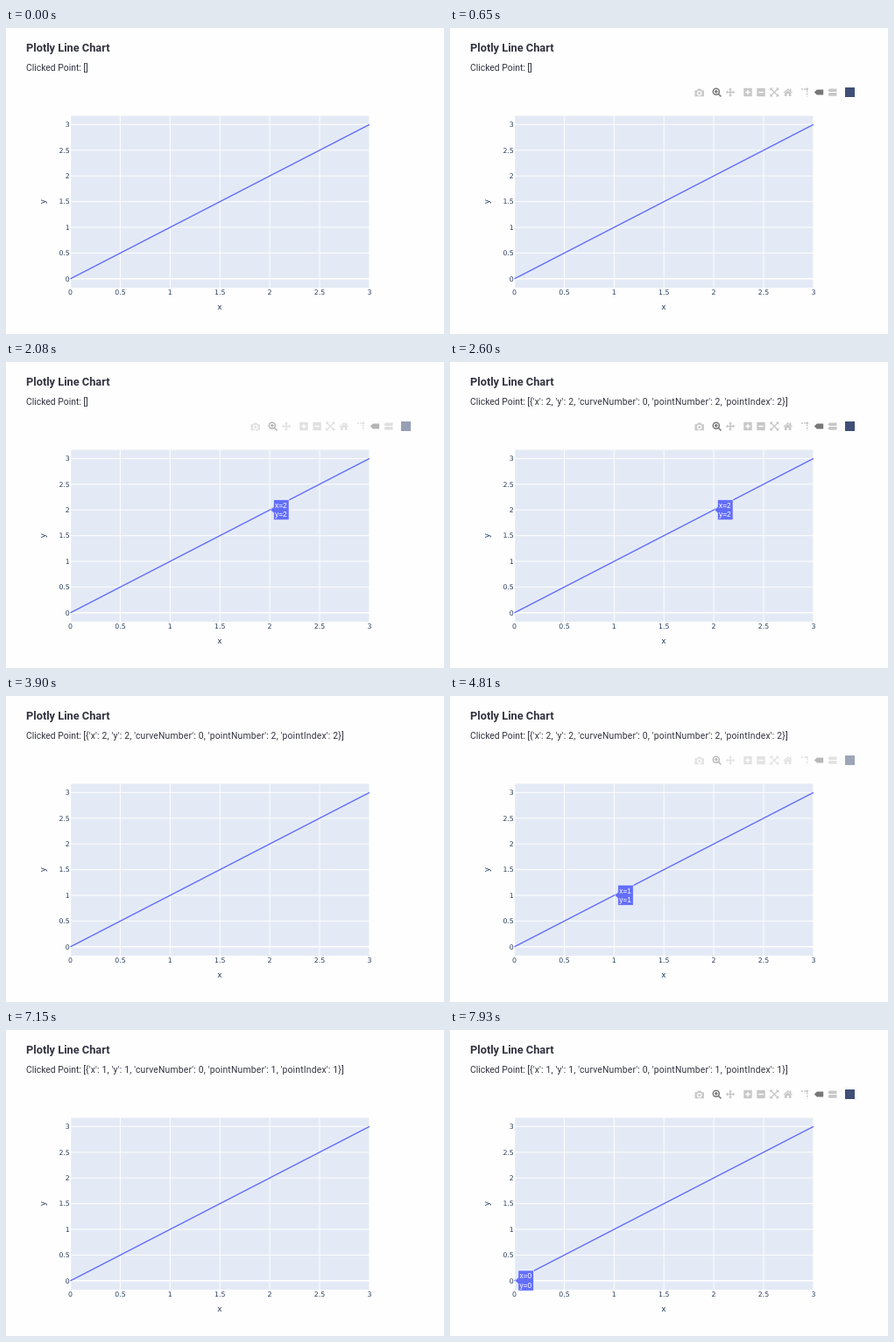
Animation of 500x350 px, one loop 8000 ms. Source, as an HTML page:

```html
<!DOCTYPE html>
<html lang="en">
<head>
<meta charset="utf-8">
<title>Line chart with click events</title>
<style>
html, body { margin: 0; width: 100%; height: 100%; overflow: hidden; background: #fefefe; }
svg { display: block; width: 100vw; height: 100vh; }
.page { font-family: Roboto, "Noto Sans", sans-serif; fill: #31333f; }
.axis { font-family: "DejaVu Sans", sans-serif; font-size: 7.8px; fill: #2a3f5f; }
.title { font-size: 8.9px; text-anchor: middle; }
.tip { font-family: "Liberation Sans", Arial, sans-serif; font-size: 8.3px; fill: #fff; }
#bar { fill: #c7c7c7; stroke: #c7c7c7; stroke-width: 0; }
#bar .on { fill: #777; stroke: #777; }
#bar .line { fill: none; stroke-width: 1.5; }
#bar .cut { fill: none; stroke: #fefefe; stroke-width: 1.4; }
</style>
</head>
<body>
<svg viewBox="0 0 500 350">
  <g class="page">
    <text x="23" y="26.5" font-size="12.8" font-weight="600">Plotly Line Chart</text>
    <text x="23" y="48.5" font-size="10.36">Clicked Point: [<tspan id="event" letter-spacing=".19"></tspan></text>
  </g>

  <g id="bar">
    <g transform="translate(284.7 74)">
      <path d="M-5.2-2.8h2.6l1-1.7h3.2l1 1.7h2.6v7.1h-10.4z"/>
      <circle class="cut" r="2.2" cy=".6"/>
    </g>
    <g class="on" transform="translate(304.5 73.5)">
      <circle class="line" cx="-.7" cy="-.7" r="3.5"/>
      <path class="line" d="M1.8 1.8 5 5M-2.5-.7h3.6M-.7-2.5v3.6" style="stroke-width:1.6"/>
    </g>
    <g transform="translate(320 73.5)">
      <path class="line" d="M-4 0h8M0-4v8"/>
      <path d="M0-5.3l2 2.3h-4zM0 5.3l2-2.3h-4zM-5.3 0l2.3-2v4zM5.3 0l-2.3-2v4z"/>
    </g>
    <g transform="translate(340 73.5)">
      <rect x="-4.7" y="-4.7" width="9.4" height="9.4"/>
      <path class="cut" d="M-2.8 0h5.6M0-2.8v5.6"/>
    </g>
    <g transform="translate(355 73.5)">
      <rect x="-4.7" y="-4.7" width="9.4" height="9.4"/>
      <path class="cut" d="M-2.8 0h5.6"/>
    </g>
    <g transform="translate(370.3 73.5)">
      <path class="line" style="stroke-width:1.2" d="M-4-4 4 4M-4 4 4-4"/>
      <path d="M-5-5h3.6l-3.6 3.6zM5-5v3.6l-3.6-3.6zM-5 5v-3.6l3.6 3.6zM5 5h-3.6l3.6-3.6z"/>
    </g>
    <g transform="translate(385.7 73.5)">
      <path d="M-5.2.2 0-4.6l2.3 2.1v-1.6h1.4v2.9l1.5 1.4-.8.8L0-3-4.4 1zM-3.7 1 0-2.3 3.7 1v3.4h-2.6V1.6h-2.2v2.8h-2.6z"/>
    </g>
    <g transform="translate(405 73.5)">
      <path class="line" stroke-dasharray="2 1.3" d="M-4-3.6h6M2.7-2v7"/>
      <circle cx="2.7" cy="-3.6" r="1.4"/>
    </g>
    <path class="on" d="M415.8 73.5l3-3h7.4v6h-7.4z"/>
    <path d="M431.3 71.2l1.8-1.8h8.4v3.6h-8.4zM431.3 75.9l1.8-1.8h8.4v3.6h-8.4z"/>
    <rect x="451" y="68" width="11" height="11" fill="#3f4f75"/>
  </g>

  <rect x="73.5" y="100.5" width="341.5" height="196.5" fill="#e4eaf5"/>
  <g id="grid" stroke="#fff"></g>
  <path id="trace" fill="none" stroke="#636efa" stroke-width="1.4"/>
  <g id="ticks" class="axis"></g>
  <text class="axis title" x="244" y="322">x</text>
  <text class="axis title" transform="translate(45.3 198.5) rotate(-90)">y</text>

  <g id="tip" class="tip">
    <path d="M.8 0 4.3-3.5V-11.8H22V11.5H4.3V3.5z" fill="#636efa" stroke="#fff" stroke-width=".6"/>
    <text id="tipX" x="6" y="-2.4"></text>
    <text id="tipY" x="6" y="8"></text>
  </g>
</svg>
<script>
const LOOP = 8000, STEP = 130, FADE = 260;
const $ = id => document.getElementById(id);
const px = v => 73.5 + v * 113.8;
const py = v => 286.8 - v * 58.8;

// Toolbar visibility: fade-in start, moment it is hidden again.
const barSpans = [[340, 1430], [1940, 3900], [4680, 6760], [7650, LOOP]];
// Hover label: from, until, point.
const tips = [[1950, 3900, 2], [4810, 6760, 1], [7670, LOOP, 0]];
// Clicked point: from, point.
const clicks = [[2600, 2], [5850, 1]];

function add(parent, tag, attrs, text = "") {
  const el = document.createElementNS("http://www.w3.org/2000/svg", tag);
  for (const key in attrs) el.setAttribute(key, attrs[key]);
  el.textContent = text;
  parent.append(el);
}

function buildChart() {
  for (let v = 0; v <= 3; v += 0.5) {
    const x = px(v), y = py(v);
    const width = v ? 0.9 : 1.4;
    add($("grid"), "path", { d: `M${x} 100.5V297`, "stroke-width": width });
    add($("grid"), "path", { d: `M73.5 ${y}H415`, "stroke-width": width });
    add($("ticks"), "text", { x, y: 305, "text-anchor": "middle" }, v);
    add($("ticks"), "text", { x: 72.8, y: y + 2.8, "text-anchor": "end" }, v);
  }
  $("trace").setAttribute("d", `M${px(0)} ${py(0)}L${px(3)} ${py(3)}`);
}

function eventText(n) {
  return `{'x': ${n}, 'y': ${n}, 'curveNumber': 0, 'pointNumber': ${n}, 'pointIndex': ${n}}]`;
}

function render(time) {
  const t = Math.floor(time / STEP) * STEP;

  const span = barSpans.find(([from, to]) => t >= from && t < to);
  $("bar").setAttribute("opacity", span ? Math.min(1, (t - span[0]) / FADE) : 0);

  const tip = tips.find(([from, to]) => t >= from && t < to);
  $("tip").setAttribute("visibility", tip ? "visible" : "hidden");
  if (tip) {
    const n = tip[2];
    $("tip").setAttribute("transform", `translate(${px(n)} ${py(n)})`);
    $("tipX").textContent = `x=${n}`;
    $("tipY").textContent = `y=${n}`;
  }

  const click = clicks.filter(([from]) => t >= from).pop();
  $("event").textContent = click ? eventText(click[1]) : "]";
}

buildChart();
const start = performance.now();
function frame() {
  render((performance.now() - start) % LOOP);
  requestAnimationFrame(frame);
}
frame();
</script>
</body>
</html>
```
